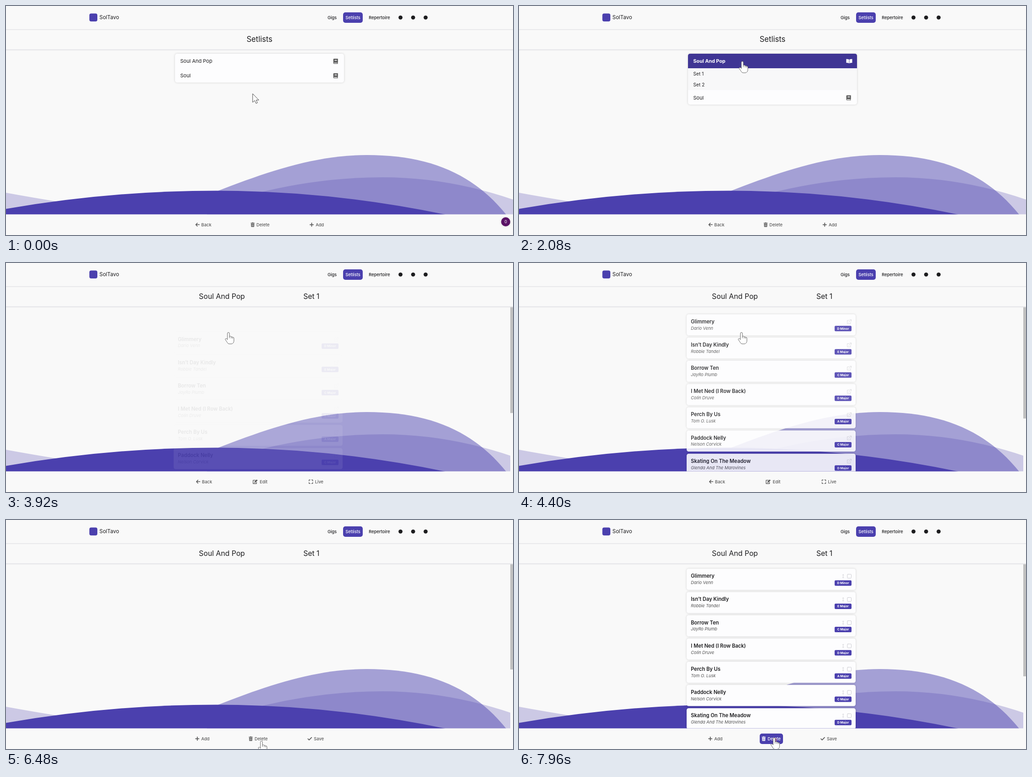
Write an HTML page that moves like this. It is 1110 px wide and 504 px high and loops after 8000 ms.

```html
<!DOCTYPE html>
<html lang="en">
<head>
<meta charset="utf-8">
<title>Setlists</title>
<style>
  html, body { margin: 0; width: 100%; height: 100%; overflow: hidden; background: #f9f9f9; }
  svg { display: block; width: 1110px; height: 504px; font-family: Inter, "Open Sans", sans-serif; }
  .shade { filter: drop-shadow(0 0 2px rgba(0, 0, 0, .16)); }
  .line { fill: none; stroke: currentColor; stroke-linecap: round; stroke-linejoin: round; }
</style>
</head>
<body>
<svg viewBox="0 0 1110 504" xmlns="http://www.w3.org/2000/svg">
  <defs>
    <clipPath id="view"><rect y="97" width="1110" height="361.5"/></clipPath>
    <clipPath id="subClip"><rect id="subWindow" x="370" y="137" width="370" height="0"/></clipPath>
  </defs>
  <rect width="1110" height="504" fill="#f9f9f9"/>

  <g id="waves" clip-path="url(#view)">
    <path fill="#a4a0d5" d="M440,416C560,369 670,328 790,328C925,328 1022,368 1095,459H440Z"/>
    <path fill="#5148ae" opacity=".27" d="M0,411Q60,422 110,430C250,450 430,440 565,408Q695,377 825,377Q967,377 1110,426V459H0Z"/>
    <path fill="#4b40ae" d="M0,446.5Q230,406.5 460,406.5Q711,406.5 962,459H0Z"/>
  </g>

  <g clip-path="url(#view)">
    <g id="setlists"></g>
    <g id="songs"></g>
  </g>
  <g id="scroll">
    <rect x="1104" y="97" width="6" height="362" fill="#f9f9f9"/>
    <rect id="thumb" x="1104" y="96" width="6" fill="#c0c0c0"/>
  </g>

  <rect y="51" width="1110" height="2" fill="#e9e9eb"/>
  <rect y="95.5" width="1110" height="2" fill="#e4e4e7"/>
  <g id="header"></g>
  <g id="titles"></g>
  <g id="footers"></g>

  <g id="badge">
    <circle class="shade" cx="1094" cy="475" r="10" fill="#5a1266"/>
    <text x="1094" y="478.3" font-size="9" fill="#fff" text-anchor="middle">0</text>
  </g>
  <circle id="ring" r="3.6" fill="none" stroke="#e06a6a"/>
  <g id="cursor" fill="#fff" stroke="#555" stroke-width=".9" stroke-linejoin="round">
    <path id="arrow" stroke="#333" d="M0,0V19L4.5,15L7.5,21.5L10.5,20L7.7,14H13.5Z"/>
    <g id="hand">
      <path d="M-2.2,2a2.2,2.2 0 0 1 4.4,0V9C2.4,7.6 6,7.6 6,10C6.4,8.8 9.2,9 9.2,11C9.8,10 12,10.4 12,12.5V18C12,22 9.5,25 6,25H2C-1,25 -2,23 -3.5,20.5L-6.8,15.5C-7.6,13.6 -5,12.4 -3.6,13.8L-2.2,15.6Z"/>
      <path fill="none" d="M2.2,9v3.5M6,10v3M9.2,11v2.5"/>
    </g>
  </g>
</svg>

<script>
const LOOP = 8000, PURPLE = '#4b40ae', INK = '#1d1d1f', GREY = '#585858';
const $ = id => document.getElementById(id);

// ---- markup helpers ----
const text = (x, y, size, str, fill = INK, extra = '') =>
  `<text x="${x}" y="${y}" font-size="${size}" fill="${fill}" ${extra}>${str}</text>`;
const box = (x, y, w, h, r, fill, extra = '') =>
  `<rect x="${x}" y="${y}" width="${w}" height="${h}" rx="${r}" fill="${fill}" ${extra}/>`;
const middle = 'text-anchor="middle"';

// Icons are centred on 0,0
const line = (d, w) => `<path class="line" stroke-width="${w}" d="${d}"/>`;
const solid = d => `<path fill="currentColor" fill-rule="evenodd" d="${d}"/>`;
const icons = {
  back: line('M4,0H-3.6M-.4,-3.4L-3.8,0L-.4,3.4', 1.5),
  plus: line('M-3.7,0H3.7M0,-3.7V3.7', 1.7),
  check: line('M-4,.2L-1.4,2.9L4,-2.6', 1.7),
  trash: solid('M-4.2,-4.2H-1.6L-1,-5H1L1.6,-4.2H4.2V-3H-4.2ZM-3.6,-2.3H3.6L3.2,5H-3.2ZM-2,-1V3.8H-1.4V-1ZM-.3,-1V3.8H.3V-1ZM1.4,-1V3.8H2V-1Z'),
  edit: line('M1,-3.2H-4.5V4.2H3V1', 1.3) + solid('M-1.8,2.4L-1.3,-.2L3.4,-4.8L5.3,-2.9L.7,1.8Z'),
  live: line('M-4,-1.6V-4H-1.6M1.6,-4H4V-1.6M4,1.6V4H1.6M-1.6,4H-4V1.6', 1.3),
  book: solid('M-5,-4.2Q-5,-5.6 -3.6,-5.6H5V3H4.2V4.4H5V5.6H-3.4Q-5,5.6 -5,4ZM-2.4,-3.2V-2.3H2.8V-3.2ZM-2.4,-1.4V-.6H2.8V-1.4ZM-3.6,3Q-4.2,3.7 -3.6,4.4H3.2V3Z'),
  open: solid('M-.4,-3.7Q-3,-5 -6.5,-4.7V3.4Q-3,3.3 -.4,4.8ZM.4,-3.7Q3,-5 6.5,-4.7V3.4Q3,3.3 .4,4.8Z'),
  external: line('M0,-3H-4.3V4.3H3V.5M1.2,-4.4H4.6V-1M4.4,-4.2L-1.4,1.4', 1),
  drag: line('M0,-3.8V3.8M-1.6,-2.4L0,-4L1.6,-2.4M-1.6,2.4L0,4L1.6,2.4', .9),
  tick: line('M-3,-4.3H3Q4.3,-4.3 4.3,-3V3Q4.3,4.3 3,4.3H-3Q-4.3,4.3 -4.3,3V-3Q-4.3,-4.3 -3,-4.3Z', .9)
};
const icon = (name, x, y, color) =>
  `<g transform="translate(${x} ${y})" color="${color}">${icons[name]}</g>`;

// ---- header and titles ----
$('header').innerHTML =
  box(182.5, 16.5, 17.5, 17.5, 4, PURPLE) +
  text(204.5, 29.2, 11.5, 'SolTavo') +
  box(738, 14, 43, 23, 5, PURPLE) +
  [['Gigs', 714], ['Setlists', 759.5], ['Repertoire', 817.5]].map(([s, x]) =>
    text(x, 28.8, 9.4, s, s === 'Setlists' ? '#fff' : INK, middle + ' font-weight="450"')).join('') +
  [863.7, 891.3, 918.7].map(x => `<circle cx="${x}" cy="25.3" r="4.4" fill="${INK}"/>`).join('');

$('titles').innerHTML =
  `<g id="titleAll">${text(555, 79.2, 16.6, 'Setlists', INK, middle)}</g>` +
  `<g id="titleSet">${text(472.7, 79.2, 15.8, 'Soul And Pop', INK, middle)}${text(668.6, 79.2, 15.8, 'Set 1', INK, middle)}</g>`;

// ---- footers: icon, icon x, label, label x ----
const button = ([name, ix, label, tx], color) =>
  icon(name, ix, 481.3, color) + text(tx, 484.7, 9.4, label, color, 'font-weight="500"');
const footers = [
  [['back', 419.3, 'Back', 427.5], ['trash', 540, 'Delete', 548.3], ['plus', 669.3, 'Add', 678]],
  [['back', 420.7, 'Back', 429], ['edit', 545.5, 'Edit', 555.5], ['live', 667.5, 'Live', 676.5]],
  [['plus', 418.8, 'Add', 427.5], ['trash', 535.8, 'Delete', 544.3], ['check', 665, 'Save', 674]]
];
const hover = (id, x, w, item) =>
  `<g id="${id}">${box(x, 470, w, 23, 5, PURPLE)}${button(item, '#fff')}</g>`;
$('footers').innerHTML = footers.map((items, i) =>
  `<g id="footer${i}">${items.map(b => button(b, GREY)).join('')}` +
  (i === 1 ? hover('hoverEdit', 536, 42, items[1]) : '') +
  (i === 2 ? hover('hoverDelete', 527, 51, items[1]) : '') + '</g>').join('');

// ---- setlists accordion ----
$('setlists').innerHTML =
  box(370, 105, 370, 63.5, 5, '#fdfdfe', 'id="panel" class="shade"') +
  text(381.5, 125.1, 11, 'Soul And Pop') + icon('book', 721.7, 121.7, GREY) +
  `<g id="opened"><path fill="#3f3594" d="M370,137V110Q370,105 375,105H735Q740,105 740,110V137Z"/>` +
  text(381.5, 125.1, 10.8, 'Soul And Pop', '#fff', 'font-weight="700"') + icon('open', 723, 121.5, '#fff') + '</g>' +
  `<g clip-path="url(#subClip)">${box(370, 137, 370, 48.5, 0, '#f8f8f9')}` +
  text(381.5, 152.7, 10.2, 'Set 1') + text(381.5, 177, 10.2, 'Set 2') + '</g>' +
  `<g id="second">${text(381.5, 157, 11, 'Soul') + icon('book', 721.7, 153.5, GREY)}</g>`;

// ---- songs ----
const songs = [
  ['Glimmery', 'Dario Venn', 'D Minor'],
  ['Isn’t Day Kindly', 'Robbie Tandel', 'E Major'],
  ['Borrow Ten', 'JayRo Plumb', 'C Major'],
  ['I Met Ned (I Row Back)', 'Colin Druve', 'D Major'],
  ['Perch By Us', 'Tom O. Lusk', 'A Major'],
  ['Paddock Nelly', 'Nelson Corvick', 'C Major'],
  ['Skating On The Meadow', 'Glenda And The Marovines', 'D Major']
];
const card = ([title, artist, key], i) =>
  `<g transform="translate(0 ${(i * 51.15).toFixed(2)})">` +
  box(367, 107.3, 370, 46.4, 4.5, '#fdfdfe', 'class="shade"') +
  text(376.3, 127.3, 11.1, title, INK, 'font-weight="600"') +
  text(376.3, 141.2, 9.3, artist, '#505050', 'font-style="italic"') +
  box(691, 132.8, 37, 12, 2.2, PURPLE) +
  text(709.5, 141.2, 6.8, key, '#fff', middle + ' font-weight="700"') +
  `<g class="viewing">${icon('external', 723, 123.7, '#d9d9dc')}</g>` +
  `<g class="editing">${icon('drag', 709.7, 123.7, '#d2d2d6')}${icon('tick', 723.2, 123.7, '#c9c9ce')}</g></g>`;
$('songs').innerHTML = songs.map(card).join('');
const viewing = document.querySelectorAll('.viewing');
const editing = document.querySelectorAll('.editing');

// ---- motion ----
const ramp = (t, a, b) => Math.min(1, Math.max(0, (t - a) / (b - a)));
const ease = u => (1 - Math.cos(Math.PI * u)) / 2;
const step = (t, a, b) => ease(ramp(t, a, b));

// Cursor path: time, x, y
const path = [
  [40, 540, 193], [440, 524, 163], [600, 524, 163], [1280, 489, 122],
  [2280, 489, 122], [3080, 487, 153], [4840, 487, 153], [4920, 488.5, 145.7],
  [5440, 559.3, 486.7], [7240, 559.3, 486.7], [7800, 558.5, 479.5]
];
function cursorAt(t) {
  if (t <= path[0][0]) return path[0].slice(1);
  const i = path.findIndex(k => k[0] > t);
  if (i < 0) return path[path.length - 1].slice(1);
  const [a, x0, y0] = path[i - 1], [b, x1, y1] = path[i];
  const u = step(t, a, b);
  return [x0 + (x1 - x0) * u, y0 + (y1 - y0) * u];
}

const show = (el, on) => el.setAttribute('visibility', on ? 'inherit' : 'hidden');
const fade = (el, v) => { el.setAttribute('opacity', v); show(el, v > 0); };
const shift = (el, x, y) => el.setAttribute('transform', `translate(${x} ${y})`);

function render(t) {
  const page = t < 3740 ? 0 : t < 6360 ? 1 : 2;
  footers.forEach((_, i) => show($('footer' + i), i === page));
  show($('titleAll'), page === 0);
  show($('titleSet'), page > 0);
  show($('scroll'), page > 0);
  show($('badge'), t < 40);

  const open = step(t, 1440, 1800);
  fade($('setlists'), page ? 0 : 1 - step(t, 3200, 3720));
  fade($('opened'), open);
  $('panel').setAttribute('height', 63.5 + 48.5 * open);
  $('subWindow').setAttribute('height', 48.5 * open);
  shift($('second'), 0, 48.5 * open);

  const shown = page === 0 ? 0
    : page === 1 ? step(t, 3776, 4576) * (1 - step(t, 5600, 6340))
    : step(t, 6468, 7268);
  fade($('songs'), shown);
  shift($('songs'), 0, 48 * (1 - shown));
  $('thumb').setAttribute('height', 233 + 15 * shown);
  viewing.forEach(g => show(g, page === 1));
  editing.forEach(g => show(g, page === 2));

  fade($('hoverEdit'), page === 1 ? ramp(t, 5360, 5520) : 0);
  fade($('hoverDelete'), page === 2 ? ramp(t, 6680, 6840) : 0);

  const [x, y] = cursorAt(t);
  shift($('cursor'), x, y);
  show($('arrow'), t < 440);
  show($('hand'), t >= 440);
  const late = t >= 7880;
  show($('ring'), late || (t >= 4840 && t < 5000));
  shift($('ring'), late ? 560 : 485.5, late ? 484 : 152);
}

let start;
function tick(now) {
  start ??= now;
  render((now - start) % LOOP);
  requestAnimationFrame(tick);
}
render(0);
requestAnimationFrame(tick);
</script>
</body>
</html>
```
